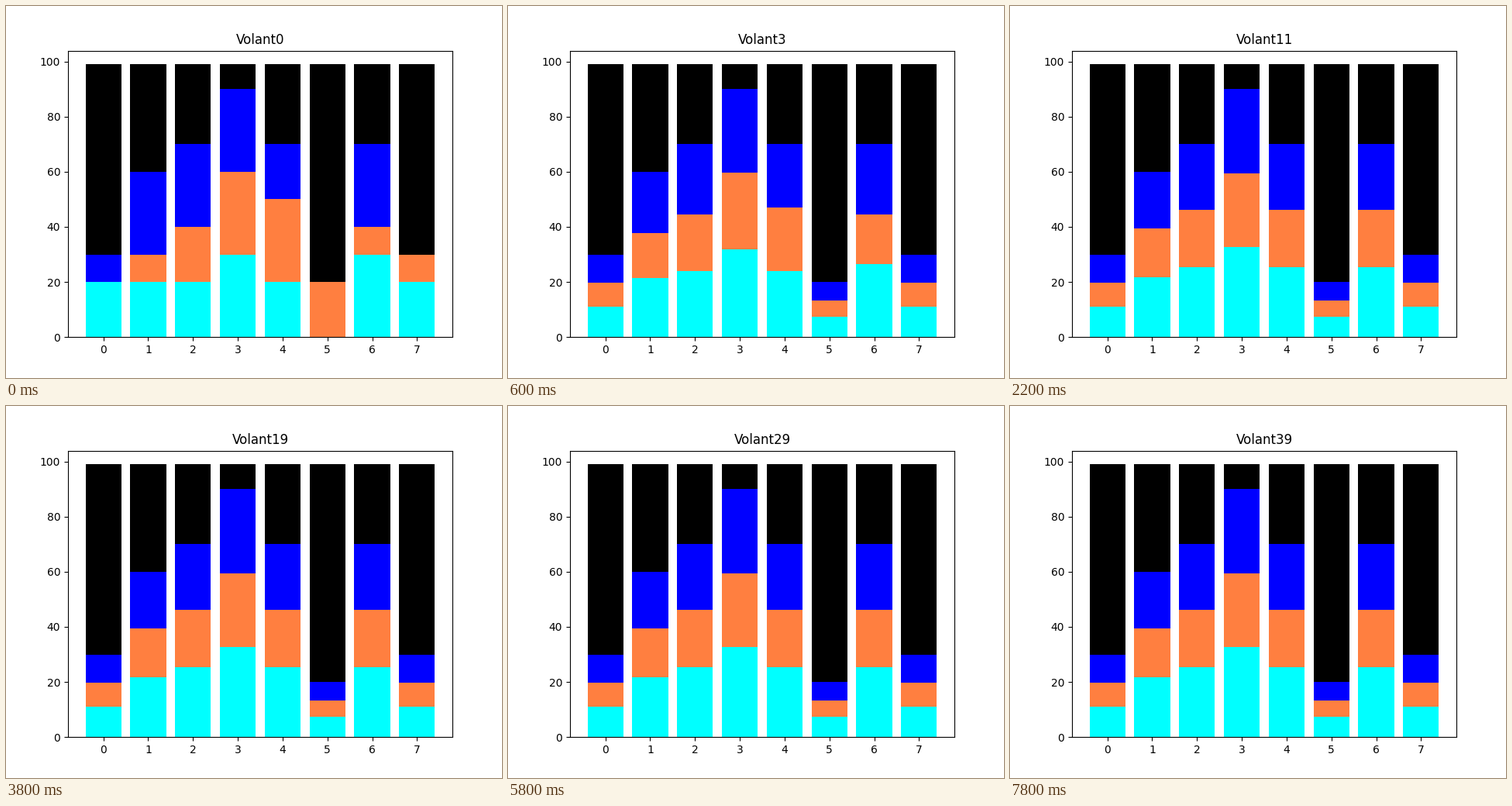
Animation of 640 by 480 pixels, one loop 8 s. Source, as a matplotlib script:

```python
import numpy as np
import matplotlib.pyplot as plt
from matplotlib.animation import FuncAnimation

STEPS, STEP_MS = 40, 200
CAPACITY = 99
FLOW = 26  # volume each tank exchanges per step

# Starting volume of each liquid in the eight tanks, bottom liquid first
start = 10.0 * np.array([
    [2, 2, 2, 3, 2, 0, 3, 2],
    [0, 1, 2, 3, 3, 2, 1, 1],
    [1, 3, 3, 3, 2, 0, 3, 0],
])
total = start.sum(axis=0)
share = start.sum(axis=1) / start.sum()
mixed = np.outer(share, total)
kept = np.clip(1 - FLOW / total, 0, 1)


def surfaces(step):
    """Top of each liquid; small tanks reach the common mix sooner."""
    volume = mixed + (start - mixed) * kept ** step
    return np.cumsum(volume, axis=0)


fig, ax = plt.subplots(figsize=(6.4, 4.8), dpi=100)
x = np.arange(len(total))
ax.bar(x, np.full(len(x), CAPACITY), color="black")
ax.bar(x, total, color="#0000ff")
upper = ax.bar(x, total, color="#ff7f40")
lower = ax.bar(x, total, color="#00ffff")
title = ax.set_title("Volant0")


def update(step):
    tops = surfaces(step)
    for bars, heights in zip((lower, upper), tops):
        for bar, height in zip(bars, heights):
            bar.set_height(height)
    title.set_text(f"Volant{step}")
    return [*lower, *upper, title]


anim = FuncAnimation(fig, update, frames=STEPS, interval=STEP_MS,
                     init_func=lambda: update(0), repeat=True)
plt.show()
```
